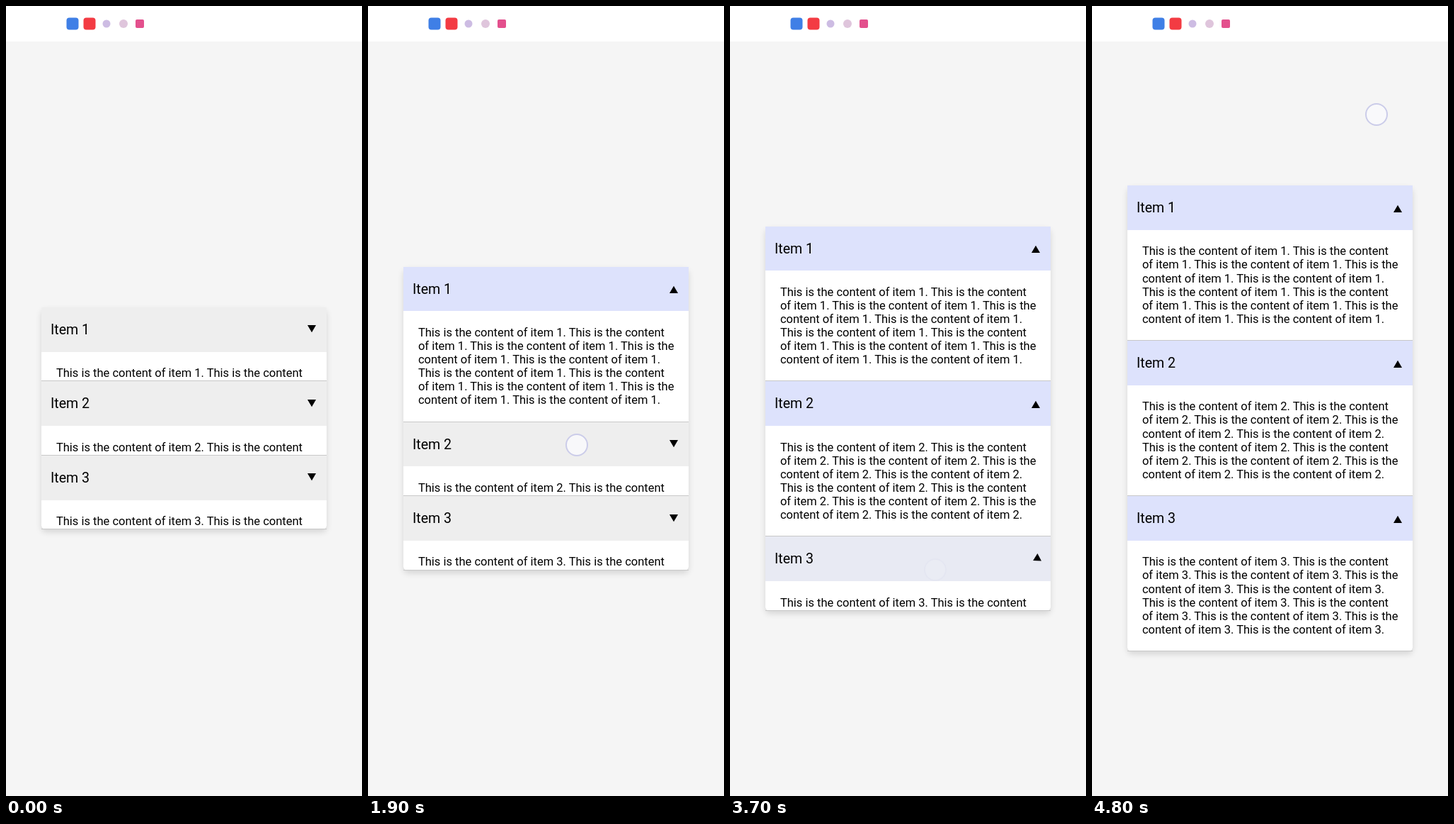
An HTML page that plays this animation: 503 px wide and 1114 px high, repeating every 4.9 s.

```html
<!DOCTYPE html>
<html lang="en">
<head>
<meta charset="utf-8">
<title>Accordion</title>
<style>
  html, body { margin: 0; width: 100%; height: 100%; overflow: hidden; }
  body { position: relative; background: #f5f5f5; color: #000; font-family: Roboto, "Noto Sans", sans-serif; }
  .bar { position: absolute; left: 0; top: 0; width: 100%; height: 50px; background: #fff; }
  .bar i { position: absolute; transform: translate(-50%, -50%); top: 25px; }
  .card {
    position: absolute; left: 50px; width: 402.6px; background: #fff;
    border-radius: 6px; box-shadow: 0 4px 9px rgba(0, 0, 0, .13);
  }
  .item { border-bottom: 1px solid #c8c8c8; }
  .head { position: relative; height: 62.7px; font-size: 19.6px; line-height: 64px; padding-left: 12.9px; }
  .head svg { position: absolute; left: 371.5px; top: 21.35px; width: 20px; height: 20px; overflow: visible; }
  .body { overflow: hidden; background: #fff; }
  .item:last-child .body { border-radius: 0 0 6px 6px; }
  .body p { margin: 0; padding: 20.5px 0 0 20.9px; font-size: 16.5px; line-height: 19.1px; white-space: nowrap; }
  .touch {
    position: absolute; box-sizing: border-box; width: 32px; height: 32px; margin: -16px;
    border: 2px solid #cbcce9; border-radius: 50%; background: rgba(250, 250, 253, .8);
  }
</style>
</head>
<body>
<div class="bar"></div>
<div class="card"></div>
<div class="touch"></div>
<script>
const LOOP = 4900, STEP = 100;
const MID = 581.7, HEAD = 62.7, SHUT = 40.7, TEXT = 114.6;
const GROW = 0.13;      // px per ms
const TURN = 300;       // arrow and colour change
const GROW_DELAY = 90;
const HOLD = 250, FADE = 80;
const IDLE = [238, 238, 238], ACTIVE = [221, 226, 252];

const CLICKS = [664, 2110, 3630];
const TOUCHES = [
  { x: 295, y: 457, at: CLICKS[0] },
  { x: 295, y: 619, at: CLICKS[1] },
  { x: 290, y: 795, at: CLICKS[2] },
  { x: 402, y: 153, at: 5020 }
];
// x, size, radius, colour
const ICONS = [
  [93.5, 17, 4, "#3f7fe6"], [117.5, 17, 4, "#f33b43"], [141.5, 11, 5.5, "#cdbce3"],
  [165.5, 12, 6, "#dfc5dc"], [189, 12, 2, "#e3508d"]
];

const $ = s => document.querySelector(s);
const clamp = v => Math.min(1, Math.max(0, v));
const easeOut = v => 1 - Math.pow(1 - v, 1.6);
const card = $(".card"), dot = $(".touch");

for (const [x, size, radius, color] of ICONS) {
  const icon = document.createElement("i");
  icon.style.cssText =
    `left:${x}px;width:${size}px;height:${size}px;border-radius:${radius}px;background:${color}`;
  $(".bar").append(icon);
}

function copy(n) {
  const s = "This is the content", e = `of item ${n}.`;
  const half = [`${s} ${e} ${s}`, `${e} ${s} ${e} This is the`, `content ${e} ${s} ${e}`];
  return [...half, ...half].join("<br>");
}

const items = CLICKS.map((click, i) => {
  const el = document.createElement("div");
  el.className = "item";
  el.innerHTML = `<div class="head">Item ${i + 1}
    <svg viewBox="-10 -10 20 20"><path d="M-6-5.9H6L0 4.3Z"/></svg></div>
    <div class="body"><p>${copy(i + 1)}</p></div>`;
  card.append(el);
  return {
    click,
    head: el.querySelector(".head"),
    arrow: el.querySelector("path"),
    body: el.querySelector(".body")
  };
});

function draw(t) {
  let height = 0;
  for (const { click, head, arrow, body } of items) {
    const turn = easeOut(clamp((t - click) / TURN));
    const open = Math.min(TEXT, Math.max(0, (t - click - GROW_DELAY) * GROW));
    const rgb = IDLE.map((c, k) => Math.round(c + (ACTIVE[k] - c) * turn));
    head.style.background = `rgb(${rgb})`;
    arrow.setAttribute("transform", `rotate(${180 * turn})`);
    body.style.height = SHUT + open + "px";
    height += HEAD + SHUT + open + 1;
  }
  card.style.top = MID - height / 2 + "px";

  const touch = TOUCHES.find(p => t >= p.at - HOLD && t < p.at + FADE);
  dot.style.opacity = touch ? 1 - clamp((t - touch.at) / FADE) : 0;
  if (touch) {
    dot.style.left = touch.x + "px";
    dot.style.top = touch.y + "px";
  }
}

const start = performance.now();
function tick() {
  const t = (performance.now() - start + 15) % LOOP;
  draw(Math.floor(t / STEP) * STEP);
  requestAnimationFrame(tick);
}
tick();
</script>
</body>
</html>
```
